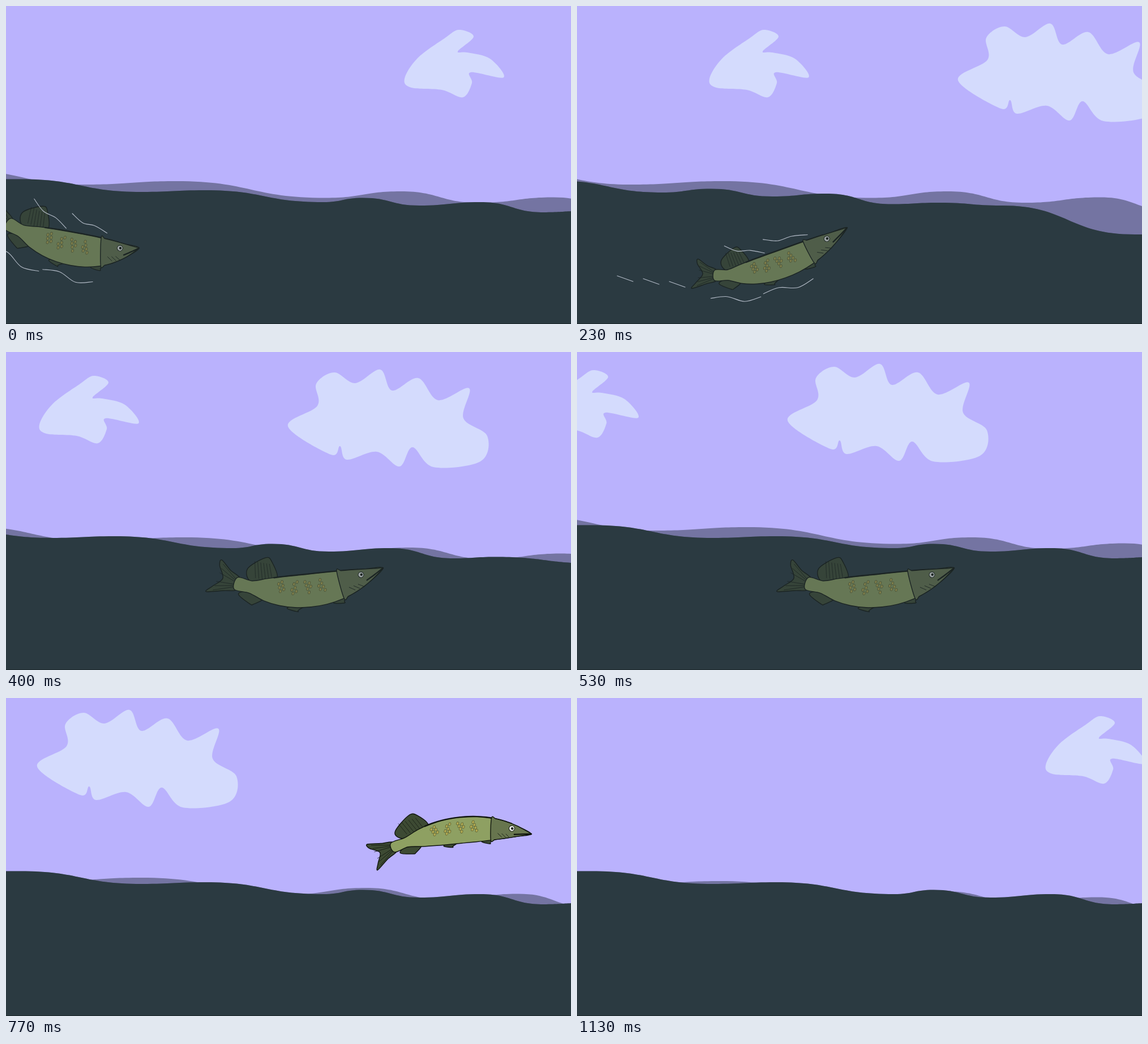
Animation of 998 by 561 pixels, one loop 1.16 s. Source, as an HTML page with a canvas:

```html
<!DOCTYPE html>
<html lang="en">
<head>
<meta charset="utf-8">
<title>Leaping pike</title>
<style>
html, body { margin: 0; width: 998px; height: 561px; overflow: hidden; }
canvas { display: block; }
</style>
</head>
<body>
<canvas id="stage" width="998" height="561"></canvas>
<script>
const ctx = document.getElementById('stage').getContext('2d');
const LOOP = 1160, STEPS = 35, HELD_STEP = 27, CLOUD_SPAN = 1834, CLOUD_GAP = 645;
const SKY = '#bab2fd', CLOUD = '#d4dbfd', WATER = '#2c3a41', FAR_WATER = '#7474a2';
const INK = '#10150f', FIN = '#3d4a33', SKIN = '#8ea062', HEAD = '#67754e', SPOT = '#b3ab52';

// Outlines through bumps and notches
const SMALL_CLOUD = [704,128, 727,92, 776,56, 800,42, 826,54, 798,80, 815,82, 855,93, 879,126, 821,117, 823,136, 807,161, 770,148, 716,144];
const BIG_CLOUD = [498,131, 550,95, 548,56, 580,36, 617,55, 661,31, 682,68, 728,46, 763,85, 818,64,
  808,117, 850,148, 838,193, 755,203, 718,168, 695,202, 655,176, 602,190, 590,166, 574,181];
// Crests and troughs, in turn
const FAR_WAVE = [-80,290, 140,315, 300,309, 565,338.5, 697,327, 835,347, 968,337.5, 1090,360];
const CALM = [25,305.5, 240,328, 352,325, 560,346, 630,338.5, 730,352, 838,346, 950,364, 1025,361.5, 1200,373];
const SWELL = [-40,308, 150,329, 237,322.5, 345,336, 440,331, 555,349.5, 640,347, 750,352, 985,403, 1100,403];

// Motion keys: [step, ...values]
const CLOUD_X = [[0, 0], [7, -470], [12, -645], [16, -771], [23, -1088], [27, -1338], [33, -1710]];
const FAR_SHIFT = [[0, 0,0], [7, -43,0], [12, 15,18], [16, 0,0], [23, -62,8], [27, -62,13], [33, -48,14]];
const NEAR_MOTION = [[0, 0,0], [7, 0,1], [12, -160,0], [16, 0,0]]; // scroll, swell
// Spine as a curve: tail x, y, bend y, snout x, y; then girth
const FISH = [
  [0, 3,384, 452, 235,427, 1.27],
  [7, 243,475, 479, 477,391, 1.08],
  [12, 406,408, 447, 666,381, 1.27],
  [16, 406,408, 447, 666,381, 1.27],
  [23, 683,264, 214, 928,240, 1],
  [27, 868,257, 262, 1113,291, 1],
  [31, 1060,300, 330, 1290,380, 1]
];

const mix = (a, b, f) => a.map((v, i) => v + (b[i] - v) * f);

function at(keys, step) {
  const i = keys.findIndex(k => k[0] > step);
  if (i < 0) return keys[keys.length - 1].slice(1);
  const a = keys[i - 1], b = keys[i];
  return mix(a, b, (step - a[0]) / (b[0] - a[0])).slice(1);
}

// Smooth curve through flat x, y points
function spline(pts, closed) {
  const path = new Path2D(), count = pts.length / 2;
  const get = i => {
    i = closed ? (i + count) % count : Math.max(0, Math.min(count - 1, i));
    return [pts[2 * i], pts[2 * i + 1]];
  };
  path.moveTo(...get(0));
  for (let i = 0; i < (closed ? count : count - 1); i++) {
    const [p, a, b, q] = [i - 1, i, i + 1, i + 2].map(get);
    path.bezierCurveTo(a[0] + (b[0] - p[0]) / 6, a[1] + (b[1] - p[1]) / 6,
      b[0] - (q[0] - a[0]) / 6, b[1] - (q[1] - a[1]) / 6, ...b);
  }
  if (closed) path.closePath();
  return path;
}

// Water below a line that is level at every crest and trough
function sea(pts) {
  const path = new Path2D();
  let [x, y] = pts;
  path.moveTo(-300, 561);
  path.lineTo(-300, y);
  path.lineTo(x, y);
  for (let i = 2; i < pts.length; i += 2) {
    const [nx, ny] = pts.slice(i), mid = (x + nx) / 2;
    path.bezierCurveTo(mid, y, mid, ny, nx, ny);
    [x, y] = [nx, ny];
  }
  path.lineTo(1500, y);
  path.lineTo(1500, 561);
  return path;
}

const smallCloud = spline(SMALL_CLOUD, true), bigCloud = spline(BIG_CLOUD, true), farSea = sea(FAR_WAVE);

function fillAt(path, color, x, y) {
  ctx.save();
  ctx.translate(x, y);
  ctx.fillStyle = color;
  ctx.fill(path);
  ctx.restore();
}

// Maps u along the spine (tail 0, snout 1) and v above it to the stage
const bender = ([ax, ay, cy, bx, by, girth]) => (u, v) => {
  const dx = bx - ax, dy = 2 * (1 - u) * (cy - ay) + 2 * u * (by - cy), k = v * girth / Math.hypot(dx, dy);
  const y = (1 - u) ** 2 * ay + 2 * u * (1 - u) * cy + u * u * by;
  return [ax + u * dx + k * dy, y - k * dx];
};

const halfHeight = u => u < .1 ? 8.5 : 23 * (1 - Math.abs(2 * u - 1) ** 2.2);

function side(from, to, sign) {
  const pts = [];
  for (let i = 0; i <= 10; i++) {
    const u = from + (to - from) * i / 10;
    pts.push([u, sign * halfHeight(u)]);
  }
  return pts;
}

function drawFish(pose) {
  const bend = bender(pose);
  const curve = (pts, closed) => spline(pts.flatMap(p => bend(...p)), closed);
  const shape = (color, pts) => {
    const path = curve(pts, true);
    ctx.lineWidth = 1.4;
    ctx.fillStyle = color;
    ctx.fill(path);
    ctx.stroke(path);
  };
  const line = (width, ...pts) => {
    ctx.lineWidth = width;
    ctx.stroke(curve(pts));
  };
  const dot = (color, u, v, r, squash = 1) => {
    ctx.fillStyle = color;
    ctx.beginPath();
    ctx.ellipse(...bend(u, v), r * squash, r, .3, 0, 7);
    ctx.fill();
  };
  const fin = (from, to, sign, height) => {
    const a = .85 * halfHeight(from), b = .85 * halfHeight(to);
    shape(FIN, [[from, a], [from - .05, a + .5 * height], [(from + to) / 2 - .02, (a + b) / 2 + height],
      [to - .05, b + .75 * height], [to, b]].map(([u, v]) => [u, sign * v]));
  };
  const outline = from => [...side(from, 1, 1), ...side(1, from, -1).slice(1)];

  ctx.strokeStyle = INK;
  ctx.lineCap = ctx.lineJoin = 'round';
  fin(.1, .27, 1, 32);
  for (let i = 0; i < 6; i++) line(.7, [.12 + i * .024, 14], [.09 + i * .023, 36]);
  fin(.085, .19, -1, 13);
  fin(.4, .47, -1, 9);
  fin(.69, .76, -1, 10);
  shape(FIN, [[.02, 8], [-.06, 15], [-.14, 24], [-.14, 16], [-.09, 1], [-.13, -14], [-.155, -25], [-.06, -15], [.02, -8]]);
  for (const v of [-6, -4, -2, 2, 4, 6]) line(.8, [-.01, v], [-.12, 3.2 * v]);

  shape(SKIN, outline(0));
  line(2.4, ...side(.25, .85, 1));
  for (let i = 1; i <= 24; i++) {
    const u = .28 + .38 * (i * .755 % 1), v = 15 - 18 * (i * .57 % 1);
    dot('#5d6235', u, v, 3.2, .75);
    dot(SPOT, u, v, 2.4, .7);
  }
  shape(HEAD, outline(.71));
  for (let i = 0; i < 3; i++) line(.9, [.76 + i * .03, -7], [.79 + i * .03, -13]);
  line(2.4, [.88, -6], [.94, -3], [1, 0]);
  dot(INK, .857, 4, 5.4);
  dot('#e8ebe6', .857, 4, 4.5);
  dot(INK, .86, 4, 2.2);
}

// Streaks along back and belly, dashes behind the tail
function drawRipples(pose) {
  const bend = bender(pose);
  ctx.strokeStyle = '#b4bcc8';
  ctx.lineWidth = 1.1;
  const streak = (u, v, endV, sag) => ctx.stroke(spline(
    [0, .33, .67, 1].flatMap(f => bend(u + .33 * f, v + (endV - v) * f + sag * Math.sin(f * 2 * Math.PI)))));
  for (let i = 0; i < 2; i++) {
    streak(.08 + .35 * i, 48, 26, -3);
    streak(-.02 + .35 * i, -38, -42, 5);
  }
  for (let i = 0; i < 3; i++) {
    const x = pose[0] - 80 - 46 * i, y = pose[1] + 11 - 5 * i;
    ctx.stroke(spline([x, y, x + 28, y + 10]));
  }
}

function draw(time) {
  const tick = Math.floor((time % LOOP) * STEPS / LOOP + .1) % STEPS;
  const step = tick > HELD_STEP ? tick - 1 : tick;
  const [cloudX] = at(CLOUD_X, step), cloudY = step < 16 ? 0 : -10;
  const [scroll, swell] = at(NEAR_MOTION, step);
  const nearSea = sea(mix(CALM, SWELL, swell)), pose = at(FISH, step);

  ctx.fillStyle = SKY;
  ctx.fillRect(0, 0, 998, 561);
  for (const x of [cloudX, cloudX + CLOUD_SPAN]) {
    fillAt(smallCloud, CLOUD, x, cloudY);
    fillAt(bigCloud, CLOUD, x + CLOUD_GAP, cloudY);
  }
  fillAt(farSea, FAR_WATER, ...at(FAR_SHIFT, step));
  fillAt(nearSea, WATER, scroll, 0);
  if (step < 31) drawFish(pose);

  // A second, thin layer of water dims whatever is submerged
  ctx.globalAlpha = .4;
  fillAt(nearSea, WATER, scroll, 0);
  ctx.globalAlpha = 1;
  if (step < 10) drawRipples(pose);
  ctx.fillStyle = '#1d272c';
  ctx.fillRect(0, 560, 998, 1);
}

function play() {
  draw(performance.now());
  requestAnimationFrame(play);
}
play();
</script>
</body>
</html>
```
